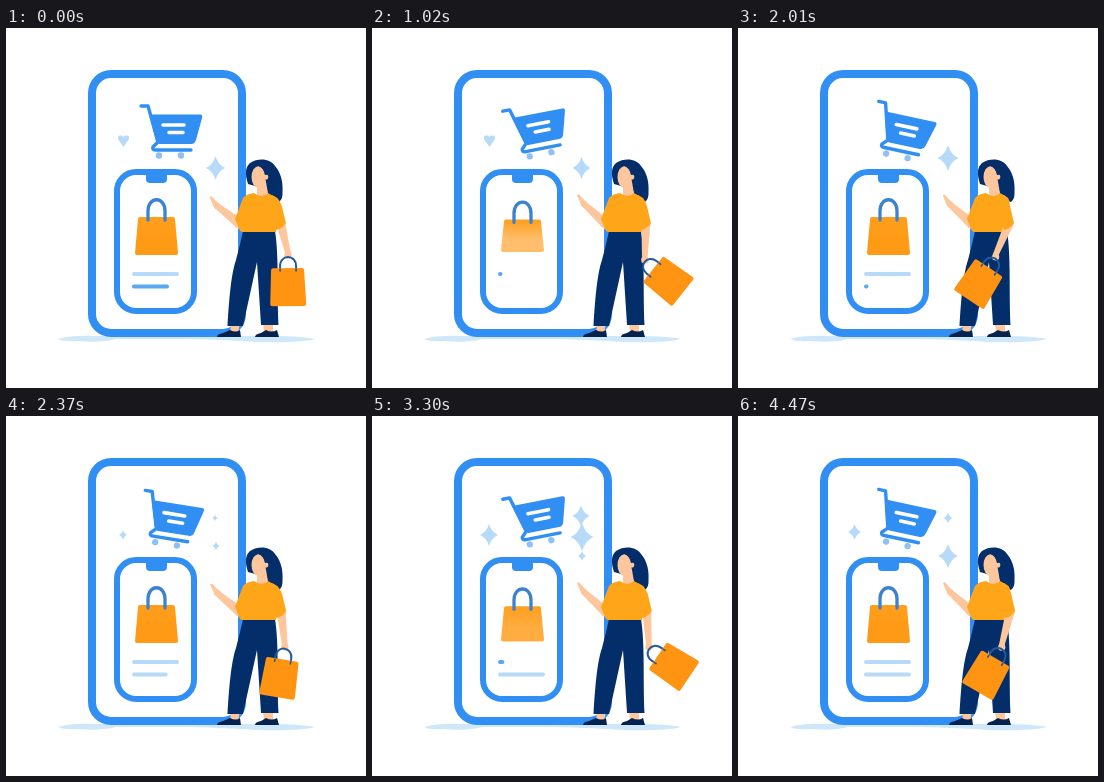
An HTML page with a canvas that plays this animation: 360x360 px, repeating every 4.5 s.

```html
<!DOCTYPE html>
<html lang="en">
<head>
<meta charset="utf-8">
<title>Mobile shopping</title>
<style>
  html, body { margin: 0; width: 100%; height: 100%; overflow: hidden; background: #fff; }
  canvas { display: block; width: 360px; height: 360px; }
</style>
</head>
<body>
<canvas id="stage"></canvas>
<script>
const LOOP = 4500, SWING = 2350, POINT = 1200;
const BLUE = '#318ff3', PALE = '#b7daf9', NAVY = '#032e69', ORANGE = '#ffa51a', SKIN = '#fec69c';

const canvas = document.getElementById('stage');
const ctx = canvas.getContext('2d');
const scale = window.devicePixelRatio || 1;
canvas.width = canvas.height = 360 * scale;

const ramp = (t, a, b) => Math.min(1, Math.max(0, (t - a) / (b - a)));
const wave = (t, peak, period) => Math.cos(2 * Math.PI * (t - peak) / period);
const bump = (t, mid, width) => Math.exp(-(((t - mid) / width) ** 2));
const mix = (a, b, k) => a + (b - a) * k;

function fill(d, color) {
  ctx.fillStyle = color;
  ctx.fill(new Path2D(d));
}

function stroke(d, color, width) {
  ctx.strokeStyle = color;
  ctx.lineWidth = width;
  ctx.stroke(new Path2D(d));
}

function frame(x, y, w, h, r, width) {
  ctx.strokeStyle = BLUE;
  ctx.lineWidth = width;
  ctx.beginPath();
  ctx.roundRect(x, y, w, h, r);
  ctx.stroke();
}

function oval(x, y, rx, ry, color) {
  ctx.fillStyle = color;
  ctx.beginPath();
  ctx.ellipse(x, y, rx, ry, 0, 0, 7);
  ctx.fill();
}

const dot = (x, y, r, color) => oval(x, y, r, r, color);

function placed(x, y, degrees, draw) {
  ctx.save();
  ctx.translate(x, y);
  ctx.rotate(degrees * Math.PI / 180);
  draw();
  ctx.restore();
}

// Tapered limb with rounded ends
function limb(x1, y1, x2, y2, w1, w2) {
  const len = Math.hypot(x2 - x1, y2 - y1);
  const nx = (y1 - y2) / len / 2, ny = (x2 - x1) / len / 2;
  fill(`M${x1 + nx * w1} ${y1 + ny * w1}L${x2 + nx * w2} ${y2 + ny * w2}` +
    `L${x2 - nx * w2} ${y2 - ny * w2}L${x1 - nx * w1} ${y1 - ny * w1}Z`, SKIN);
  dot(x1, y1, w1 / 2, SKIN);
  dot(x2, y2, w2 / 2, SKIN);
}

// x, y, radius, start, end
const stars = [
  [209.5, 140, 13, -700, 1600],
  [210, 130, 13, 1500, 2400],
  [209, 102, 10.5, 2350, 3050],
  [209, 100, 10.5, 3050, 3550],
  [210, 121, 14, 2950, 3650],
  [210, 140, 13, 3220, 5100],
  [210, 102, 5.5, 4300, 4640],
  [117, 119, 12, 2300, 3750],
  [116.5, 116, 8, 4250, 4700]
];

function drawStars(t) {
  for (const [x, y, r, start, end] of stars) {
    if (t <= start || t >= end) continue;
    const h = r * Math.sqrt(Math.sin(Math.PI * (t - start) / (end - start)));
    const w = h * 0.82, c = h * 0.24;
    placed(x, y, 0, () => fill(
      `M0 ${-h}Q${c} ${-c} ${w} 0Q${c} ${c} 0 ${h}Q${-c} ${c} ${-w} 0Q${-c} ${-c} 0 ${-h}`, PALE));
  }
  const size = 1 - ramp(t, 1200, 1600);
  if (size > 0) placed(117.5, 113, 0, () => {
    ctx.scale(size, size);
    fill('M0 6L-5.5-2Q-6-6-3-5.5Q-1-6 0-4Q1-6 3-5.5Q6-6 5.5-2Z', PALE);
  });
}

function drawCart(angle) {
  placed(160, 103, angle, () => {
    dot(-7, 24.5, 3.2, '#8fc1f6');
    dot(15, 24.5, 3.2, '#8fc1f6');
    stroke('M-25-25H-18L-8 11L-13 16Q-14 19-10 19H25', BLUE, 3.4);
    fill('M-17-16.5H34Q37-16.5 36-13L30 9Q29 13 25 13H-6Q-9 13-10 9Z', BLUE);
    stroke('M-3-6H18M3 1.5H17', '#fff', 3.6);
  });
}

function drawText(y, length, bright) {
  if (length <= 0) return;
  stroke(`M128 ${y}h${Math.max(0.5, length - 3)}`, bright || length < 8 ? '#5aa7f2' : PALE, 4);
}

function drawScreen(t) {
  frame(111, 144, 77, 139, 19, 6);
  fill('M140 145H161V151Q161 155 157 155H144Q140 155 140 151Z', BLUE);

  const fade = bump(t, 1050, 250) + 0.5 * bump(t, 3280, 250);
  const top = 189 + 2.5 * fade, bottom = 227 - 3 * fade;
  const shade = ctx.createLinearGradient(0, top, 0, bottom);
  shade.addColorStop(0, '#ff9f1c');
  shade.addColorStop(0.6, `rgb(255 ${mix(154, 190, fade)} ${mix(22, 108, fade)})`);
  fill(`M134 ${top}H167Q169 ${top} 169 ${top + 2}L172 ${bottom - 2}Q172 ${bottom} 170 ${bottom}` +
    `H131Q129 ${bottom} 129 ${bottom - 2}L132 ${top + 2}Q132 ${top} 134 ${top}`, shade);
  stroke(`M142 ${top + 3}V${top - 6}C142 ${top - 21} 159 ${top - 21} 159 ${top - 6}V${top + 3}`, '#3b82cf', 3.3);

  drawText(246, 46 * (1 - ramp(t, 600, 950) + ramp(t, 1010, 1500) -
    ramp(t, 2850, 3230) + ramp(t, 3235, 3800)));
  drawText(258.5, 36 * (1 - ramp(t, 100, 600)) + 46 * ramp(t, 1980, 2500), t < 700);
}

function drawBag(x, y, angle) {
  placed(x, y, -angle, () => {
    stroke('M-8 14V9C-8-3 8-3 8 9V14', '#22599b', 2);
    fill('M-15 11H14Q16 11 16 13L18 47Q18 49 16 49H-16Q-18 49-18 47L-17 13Q-17 11-15 11', '#ff9312');
    stroke('M-8 14V12M8 14V12', '#22599b', 1.6);
  });
}

function drawHead() {
  fill('M242 156Q237 141 244 135C253 129 265 131 269 138C276 146 277 156 276.5 164Q277 171 273 174Q262 172 256 160Z', NAVY);
  limb(255.5, 154, 256.5, 166, 9, 11);
  oval(252.3, 149, 6.8, 11, SKIN);
  dot(259.5, 149, 2.8, SKIN);
  fill('M243 147Q241 137 248 134Q262 133 263 146L259 147Q258 140 252 138Q247 140 243 147', NAVY);
}

function drawWoman(t, settle) {
  // Ankles, shoes and trousers
  fill('M225 295H234L232 305H224ZM257 295H267V305H258Z', SKIN);
  fill('M211 309Q211 306 217 305L224 302Q230 305 234 302L235 309ZM249 309Q249 306 255 305L260 302Q266 305 271 302L273 309Z', '#062350');
  fill('M237 203H269C273 227 271 264 272.5 297H255L251 234L237 298H221.5C223 273 225 246 230 232Q234 217 237 203', NAVY);
  drawHead();

  const down = ((1 + wave(t, 360, POINT)) / 2) ** 2;
  const handX = mix(209, 198, down), handY = mix(172, 186, down);
  limb(234, 196, handX + 3, handY + 4, 10, 6);
  limb(handX + 3, handY + 4, mix(206.5, 194, down), mix(167.5, 184.5, down), 6, 2.4);
  fill('M248 165Q256 171 262 165L267 168Q271 173 271 184L270 204H236L234 203L229 191L237 170Q240 166 248 165', ORANGE);

  const swing = wave(t, 470, SWING);
  const gripX = 270.5 + 23 * swing + 4.4 * settle;
  const gripY = 234 - 10 * swing * swing - 4 * settle;
  const elbowX = 273.5 + 4.5 * swing;
  limb(elbowX, 196, gripX, gripY - 4, 9, 5.5);
  dot(gripX, gripY - 2, 3.6, SKIN);
  fill(`M262 166Q272 167 ${elbowX + 1} 178L${elbowX + 5} 195Q${elbowX + 1} 201 ${elbowX - 5} 202L262 188Z`, ORANGE);
  drawBag(gripX, gripY, 13 + 47 * wave(t, 795, SWING) + 12 * settle);
}

function draw(t) {
  const settle = Math.exp(-t / 120);
  ctx.setTransform(scale, 0, 0, scale, 0, 0);
  ctx.clearRect(0, 0, 360, 360);
  ctx.lineCap = ctx.lineJoin = 'round';
  fill('M52 311Q66 307 90 308H265Q295 308 309 311Q295 315 250 314Q225 312 180 311H110Q95 315 72 313Q58 314 52 311', '#cfe7fb');
  frame(86, 46, 150, 259, 19, 8);
  drawStars(t);
  drawCart((0.5 - 11.5 * Math.tanh(4 * wave(t, 700, SWING))) * (1 - settle));
  drawScreen(t);
  drawWoman(t, settle);
}

const began = performance.now();
function tick() {
  draw((performance.now() - began) % LOOP);
  requestAnimationFrame(tick);
}
tick();
</script>
</body>
</html>
```
